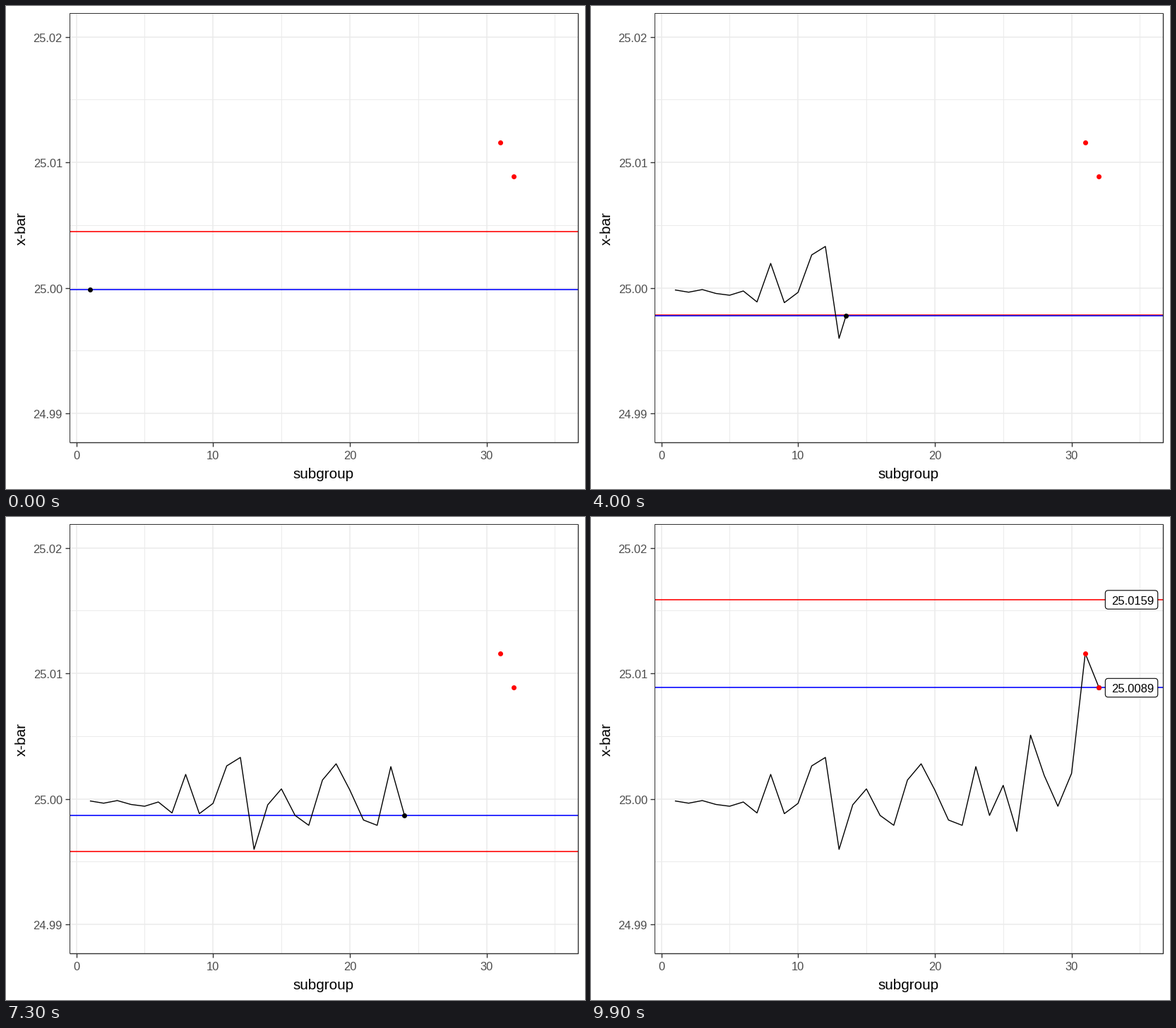
These frames come from a looping animation (820x683 px, 10000 ms). A matplotlib script:

```python
import numpy as np
import matplotlib.pyplot as plt
from matplotlib.animation import FuncAnimation
from matplotlib.patches import FancyBboxPatch

W, H, DPI = 820, 683, 100
FRAMES, STEP = 100, 100
PT = 72 / DPI
LEFT, RIGHT, TOP, BOTTOM = 89.5, 809.5, 10.5, 617.5
DARK, GREY, GRID = "#333333", "#4d4d4d", "#ebebeb"

plt.rcParams["font.family"] = "Liberation Sans"

# Heights on the stage, in pixels from the top, one per subgroup
MEAN = [401.5, 404.7, 401, 406.5, 409, 403, 418.5, 364, 419.5, 405, 352,
        340, 470, 407, 384.5, 422, 436, 372, 349, 386, 428.5, 436, 353, 422,
        379.5, 444.5, 308.5, 365.5, 409, 362.5, 193, 241]
LIMIT = [319, 238, 330, 487, 390.5, 350, 462, 251, 452, 355, 270,
         203, 481, 393, 330, 380, 471, 345, 208, 236, 474, 380, 163, 473,
         300, 477, 313.5, 135, 449, 300, 38, 117]
N = len(MEAN)


def px(subgroup):
    return 99.5 + 19.37 * subgroup


def py(value):
    return 398.6 - 17740 * (value - 25)


XS = px(np.arange(1, N + 1))
STOPS = np.round(np.arange(N) * (FRAMES - 1) / (N - 1))

# The small margin keeps the pixel size from rounding down
fig = plt.figure(figsize=((W + 0.01) / DPI, (H + 0.01) / DPI), dpi=DPI,
                 facecolor="white")
ax = fig.add_axes([0, 0, 1, 1])
ax.set(xlim=(0, W), ylim=(H, 0))
ax.axis("off")


def line(x, y, color, width, z):
    return ax.plot(x, y, color=color, lw=width * PT, zorder=z,
                   solid_capstyle="butt", solid_joinstyle="round")[0]


def text(x, y, s, size, color="black", **kw):
    kw = {"ha": "center", "va": "baseline", **kw}
    return ax.text(x, y, s, fontsize=size * PT, color=color, **kw)


def dots(x, y, color, z):
    return ax.plot(x, y, "o", color=color, ms=7 * PT, mew=0, zorder=z)[0]


def tag(y, s):
    box = FancyBboxPatch((732.5, y - 9), 66, 18,
                         boxstyle="round,pad=4.2,rounding_size=4.2",
                         fc="white", ec="black", lw=1.1 * PT, zorder=8)
    ax.add_patch(box)
    return box, text(767.3, y + 6.7, s, 16.6, zorder=9)


# Grid, ticks and tick labels
for v in (24.995, 25.005, 25.015):
    line([LEFT, RIGHT], [py(v)] * 2, GRID, 1, 1)
for v in (5, 15, 25, 35):
    line([px(v)] * 2, [TOP, BOTTOM], GRID, 1, 1)
for v in (24.99, 25, 25.01, 25.02):
    y = py(v)
    line([LEFT, RIGHT], [y, y], GRID, 1.5, 1.5)
    line([84, LEFT], [y, y], DARK, 1.4, 2)
    text(79.8, y + 6.9, f"{v:.2f}", 16.5, GREY, ha="right")
for v in (0, 10, 20, 30):
    x = px(v)
    line([x, x], [TOP, BOTTOM], GRID, 1.5, 1.5)
    line([x, x], [BOTTOM, 623], DARK, 1.4, 2)
    text(x, 641, str(v), 16.5, GREY)

line([LEFT, LEFT, RIGHT], [BOTTOM, TOP, TOP], DARK, 1, 7)
line([LEFT, RIGHT, RIGHT], [BOTTOM, BOTTOM, TOP], DARK, 1.4, 7)
text(449, 668, "subgroup", 20.6)
text(27.5, 314, "x-bar", 20.6, rotation=90, rotation_mode="anchor")

limit = line([LEFT, RIGHT], [0, 0], "red", 1.6, 3)
center = line([LEFT, RIGHT], [0, 0], "blue", 1.6, 3.5)
trail = line([], [], "black", 1.4, 4)
head = dots([], [], "black", 5)
dots(XS[-2:], MEAN[-2:], "red", 6)
tags = [*tag(117, "25.0159"), *tag(241.5, "25.0089")]


def draw(i):
    x, y, top = (np.interp(i, STOPS, v) for v in (XS, MEAN, LIMIT))
    done = int(np.sum(STOPS <= i))
    trail.set_data([*XS[:done], x], [*MEAN[:done], y])
    head.set_data([x], [y])
    center.set_ydata([y, y])
    limit.set_ydata([top, top])
    for t in tags:
        t.set_visible(i == FRAMES - 1)
    return [trail, head, center, limit, *tags]


anim = FuncAnimation(fig, draw, frames=FRAMES, interval=STEP,
                     init_func=lambda: draw(0), repeat=True, repeat_delay=0)
plt.show()
```
